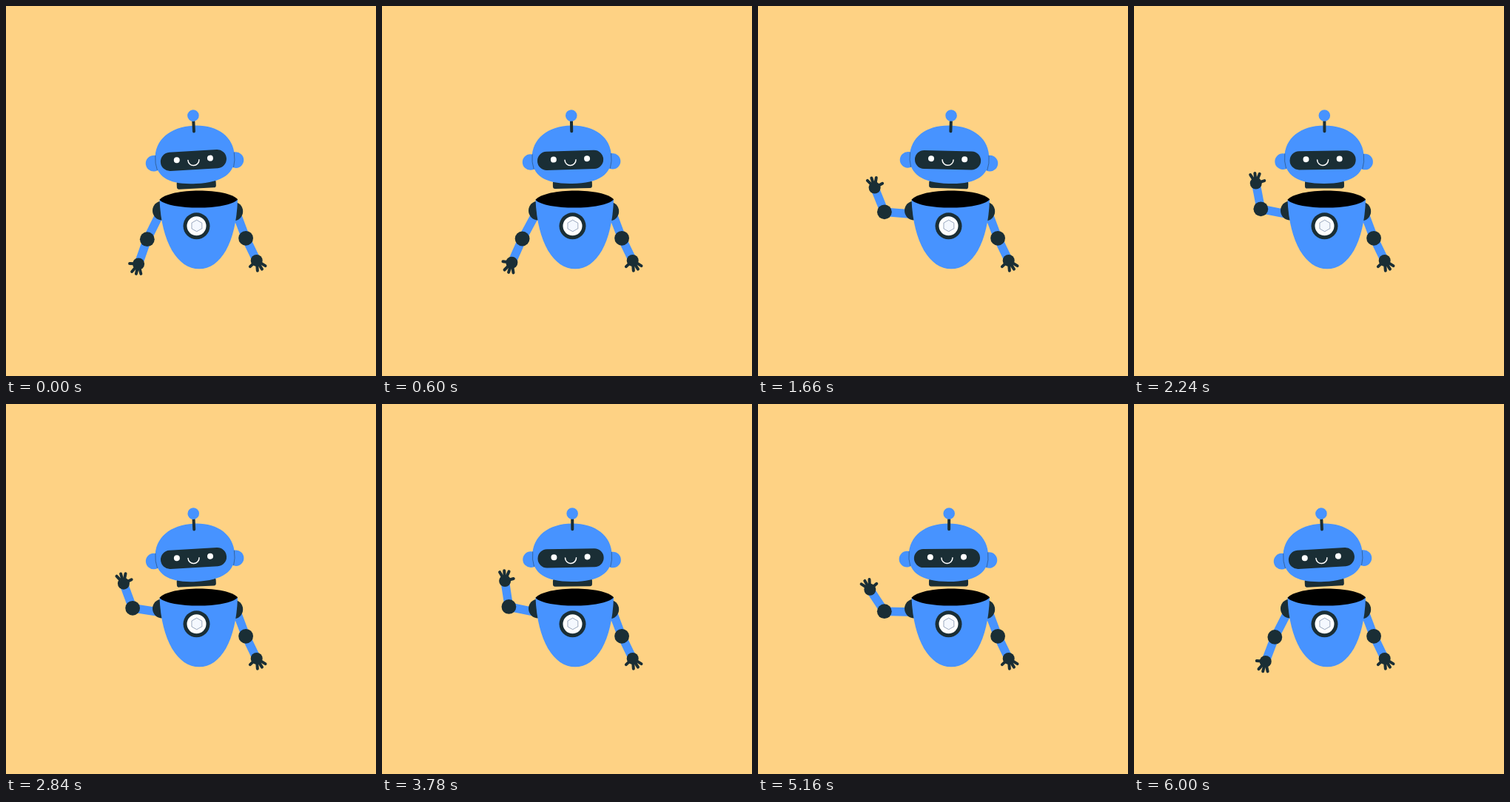
Animation of 500 by 500 pixels, one loop 6040 ms. Source, as an HTML page with a canvas:

```html
<!DOCTYPE html>
<html>
<head>
<meta charset="utf-8">
<style>
html, body { margin: 0; height: 100%; overflow: hidden; background: #fed284; }
canvas { display: block; }
</style>
</head>
<body>
<canvas id="stage" width="500" height="500"></canvas>
<script>
const ctx = document.getElementById('stage').getContext('2d');
const SAND = '#fed284', BLUE = '#4793ff', DARK = '#1a2e35', WHITE = '#fff';
const LOOP = 6040, RAD = Math.PI / 180;

// Left arm poses: [time, upper arm angle, forearm angle, wrist turn]
const POSES = [
  [450, 119.3, 109.4, -7],
  [1940, 190.5, 262, 4],
  [2930, 187.5, 249.5, 3],
  [3920, 190.5, 262, 4],
  [4950, 187.5, 249.5, 3],
  [6070, 119.3, 109.4, -7]
];

const ease = p => p * p * (3 - 2 * p);

function poseAt(t) {
  if (t < POSES[0][0]) return POSES[0].slice(1);
  const i = POSES.findIndex(k => k[0] > t);
  const a = POSES[i - 1], b = POSES[i];
  const e = ease((t - a[0]) / (b[0] - a[0]));
  return a.slice(1).map((v, j) => v + (b[j + 1] - v) * e);
}

function disc(x, y, r, color) {
  ctx.fillStyle = color;
  ctx.beginPath();
  ctx.arc(x, y, r, 0, 7);
  ctx.fill();
}

function line(x1, y1, x2, y2, width, color, cap = 'round') {
  ctx.strokeStyle = color;
  ctx.lineWidth = width;
  ctx.lineCap = cap;
  ctx.beginPath();
  ctx.moveTo(x1, y1);
  ctx.lineTo(x2, y2);
  ctx.stroke();
}

function shape(d, color) {
  ctx.fillStyle = color;
  ctx.fill(new Path2D(d));
}

function pill(x, y, w, h, r, color) {
  ctx.fillStyle = color;
  ctx.beginPath();
  ctx.roundRect(x, y, w, h, r);
  ctx.fill();
}

const polar = (x, y, angle, r) => [x + r * Math.cos(angle * RAD), y + r * Math.sin(angle * RAD)];

function arm(x, y, [upper, fore, turn], foreLength) {
  const [ex, ey] = polar(x, y, upper, 39.2);
  const [hx, hy] = polar(ex, ey, fore, foreLength);
  // the sleeve slides up in its socket as the arm hangs down
  line(x, y - 5 * Math.sin(upper * RAD), ex, ey, 11.6, BLUE, 'butt');
  line(ex, ey, hx, hy, 11.6, BLUE, 'butt');
  disc(ex, ey, 9.9, DARK);
  for (const spread of [-26, 1, 28, 80]) {
    const [fx, fy] = polar(hx, hy, fore + turn + spread, spread > 50 ? 12 : 13.8);
    line(hx, hy, fx, fy, 4, DARK);
  }
  disc(hx, hy, 8, DARK);
}

function body() {
  shape('M207.5 262C210 320 232 355.3 261 355.3C290 355.3 311 320 313 262Z', BLUE);
  shape('M207.3 262C221 245.4 300 245.4 313.2 261.5C300 276.2 221 276.2 207.3 262Z', '#000');
  disc(257.5, 297.3, 18, DARK);
  disc(257.5, 297.3, 13, WHITE);
  ctx.beginPath();
  for (let i = 0; i < 6; i++) ctx.lineTo(...polar(257.7, 297, 30 + i * 60, 7.8));
  ctx.closePath();
  ctx.fillStyle = '#f4f8ff';
  ctx.fill();
  ctx.strokeStyle = '#5b6f92';
  ctx.lineWidth = 0.6;
  ctx.stroke();
}

function head(angle) {
  ctx.save();
  ctx.translate(258, 246);
  ctx.rotate(angle * RAD);
  ctx.translate(-258, -246);

  pill(231, 236, 53, 10.5, 3, DARK);
  disc(201.3, 209.8, 10.8, BLUE);
  disc(312.3, 210.8, 10.8, BLUE);
  shape('M203.6 205C203.6 178 226 161.5 257.3 161.5S311 178 311 205C311 229 293 240 257.3 240S203.6 229 203.6 205Z', BLUE);
  ctx.strokeStyle = 'rgba(26,46,53,.65)';
  ctx.lineWidth = 0.7;
  ctx.stroke(new Path2D('M204 199.5Q202.8 210 205.6 219M310.6 200.5Q311.8 211 309 220'));

  line(257.8, 156, 257.8, 169.3, 4, DARK);
  disc(257.8, 148, 7.8, BLUE);

  ctx.translate(255.3, 208.3);
  ctx.rotate(-0.6 * RAD);
  pill(-44.6, -12.6, 89.2, 25.2, 12.6, DARK);
  disc(-22.6, -1.5, 4, WHITE);
  disc(22.6, -1.5, 4, WHITE);
  ctx.strokeStyle = WHITE;
  ctx.lineWidth = 1.5;
  ctx.beginPath();
  ctx.arc(0, -0.4, 7.5, 0, Math.PI);
  ctx.stroke();
  ctx.restore();
}

function draw(now) {
  const t = now % LOOP;
  ctx.fillStyle = SAND;
  ctx.fillRect(0, 0, 500, 500);
  arm(210, 281, poseAt(t), 35.3);
  arm(308.8, 277.7, [67, 64.2, -7], 33.5);
  disc(211, 276.5, 13, DARK);
  disc(307.2, 277.5, 13, DARK);
  body();
  head(-0.4 - 2.45 * Math.cos(t / LOOP * 4 * Math.PI));
}

const start = performance.now();
function tick() {
  draw(performance.now() - start);
  requestAnimationFrame(tick);
}
tick();
</script>
</body>
</html>
```
